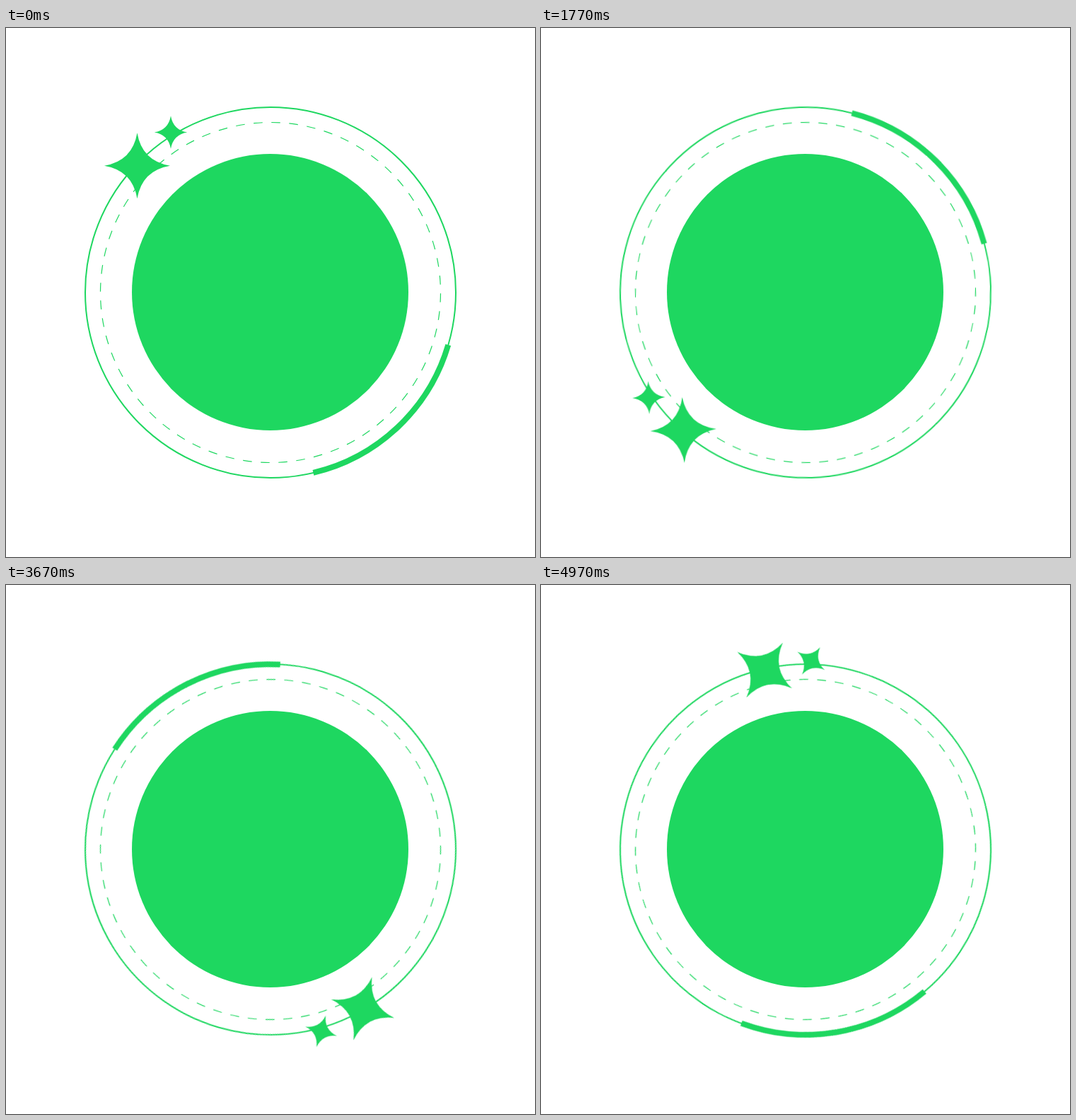
An HTML page that plays this animation: 748 px wide and 748 px high, repeating every 5010 ms.

```html
<!DOCTYPE html>
<html lang="en">
<head>
<meta charset="utf-8">
<title>Orbiting stars</title>
<style>
  html, body { margin: 0; width: 100%; height: 100%; overflow: hidden; background: #fff; }
  svg { display: block; width: 100%; height: 100%; }
  .line { fill: none; stroke: #1ed760; }
  .fill { fill: #1ed760; }

  /* 150 poses over 5000 ms, the last one held for 10 ms more */
  .orbit {
    transform-origin: 374px 374px;
    animation: orbit 5010ms -4ms infinite;
  }
  @keyframes orbit {
    0% { transform: rotate(0deg); animation-timing-function: steps(150, jump-none); }
    99.8004%, 100% { transform: rotate(753.6deg); }
  }
</style>
</head>
<body>
<svg viewBox="0 0 748 748">
  <defs>
    <path id="star" d="M0-46.5Q6.75-6.75 46.5 0Q6.75 6.75 0 46.5Q-6.75 6.75-46.5 0Q-6.75-6.75 0-46.5Z"/>
  </defs>

  <circle class="fill" cx="373.5" cy="373.5" r="195.5"/>

  <g class="orbit">
    <circle class="line" cx="374" cy="374" r="262" stroke-width="2"/>
    <circle class="line" cx="374" cy="374" r="240.5" stroke-width="1.2"
            pathLength="360" stroke-dasharray="3 3" transform="rotate(.3 374 374)"/>
    <circle class="line" cx="374" cy="374" r="262" stroke-width="8"
            pathLength="360" stroke-dasharray="60.2 299.8" transform="rotate(16.45 374 374)"/>
    <use class="fill" href="#star" transform="translate(185.5 194.7)"/>
    <use class="fill" href="#star" transform="translate(233 147.5) scale(.5)"/>
  </g>
</svg>
</body>
</html>
```
